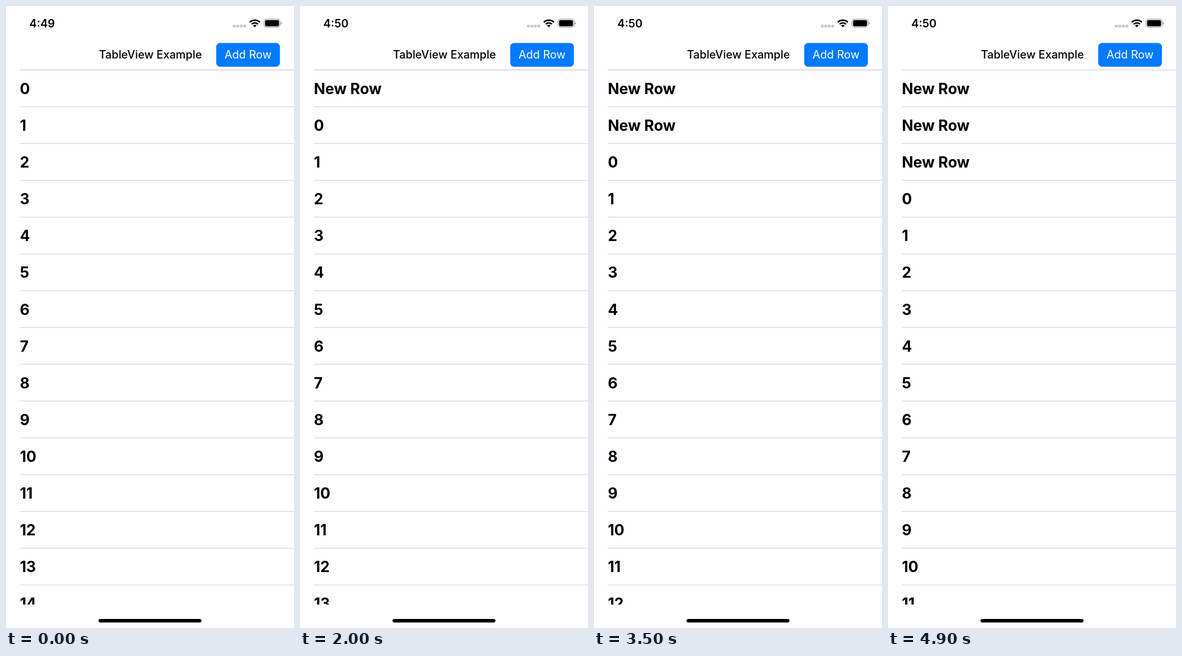
Animation, 509 px wide and 1101 px high, one loop 5000 ms. Source, as an HTML page:

```html
<!DOCTYPE html>
<html lang="en">
<head>
<meta charset="utf-8">
<title>TableView Example</title>
<style>
  html, body { margin: 0; width: 100%; height: 100%; overflow: hidden; background: #fefdff; }
  svg { display: block; width: 100%; height: 100%; font-family: Inter, "Liberation Sans", sans-serif; }
  .row { font-size: 26.5px; font-weight: 700; }
  .title { font-size: 19.7px; font-weight: 500; text-anchor: middle; }
  .action { font-size: 19.7px; text-anchor: middle; }
  .clock { font-size: 19.7px; font-weight: 600; }
</style>
</head>
<body>
<svg viewBox="0 0 509 1101" xmlns="http://www.w3.org/2000/svg">
  <defs>
    <clipPath id="view"><rect x="0" y="112" width="509" height="947.5"/></clipPath>
  </defs>

  <text id="clock" class="clock" x="41.3" y="37.6">4:49</text>
  <g fill="#c9c8cd">
    <rect x="401" y="33" width="5" height="5" rx="1.5"/>
    <rect x="407.2" y="33" width="5" height="5" rx="1.5"/>
    <rect x="413.3" y="33" width="5" height="5" rx="1.5"/>
    <rect x="419.4" y="33" width="5" height="5" rx="1.5"/>
  </g>
  <g fill="none" stroke="#000" stroke-width="2.7">
    <path d="M430.9 28.7A12.7 12.7 0 0 1 448.7 28.7"/>
    <path d="M434.2 32.1A8 8 0 0 1 445.4 32.1"/>
  </g>
  <path d="M436.6 34.5A4.6 4.6 0 0 1 443 34.5L439.8 37.7Z"/>
  <rect x="456.1" y="23.3" width="28.2" height="14.4" rx="4.4" fill="none" stroke="#9b9a9e" stroke-width="1.2"/>
  <rect x="457.9" y="25.1" width="24.6" height="10.8" rx="2.7"/>
  <path d="M485.8 28.2Q487.9 28.8 487.9 30.6T485.8 33Z" fill="#9b9a9e"/>

  <text class="title" x="255.2" y="93.3">TableView Example</text>
  <rect id="button" x="371.5" y="65.5" width="112.5" height="42" rx="6.5"/>
  <text id="label" class="action" x="427.8" y="93.3">Add Row</text>

  <g clip-path="url(#view)">
    <g id="rows"></g>
    <rect x="24.5" y="112.6" width="485" height="1.2" fill="#d4d3d9"/>
  </g>
  <rect x="163.5" y="1085" width="182" height="6.2" rx="3.1"/>
</svg>
<script>
const LOOP = 5000, STEP = 100, PITCH = 65.12, TOP = 113;
const NEW_ROWS = 3, NUMBERED = 15;
const taps = [
  { down: 1500, up: 1700 },
  { down: 3100, up: 3200 },
  { down: 4500, up: 4600 }
];
const $ = id => document.getElementById(id);
const rows = $('rows'), clock = $('clock'), button = $('button'), label = $('label');

function add(tag, attrs, text = '') {
  const el = document.createElementNS('http://www.w3.org/2000/svg', tag);
  for (const key in attrs) el.setAttribute(key, attrs[key]);
  el.textContent = text;
  rows.append(el);
}

// New rows wait above the visible list.
for (let i = -NEW_ROWS; i < NUMBERED; i++) {
  const y = TOP + i * PITCH;
  add('text', { class: 'row', x: 24.4, y: y + 42.8 }, i < 0 ? 'New Row' : String(i));
  add('rect', { x: 24.5, y: y + PITCH - 0.4, width: 485, height: 1.2, fill: '#d4d3d9' });
}

const mix = (a, b, k) => `rgb(${a.map((v, i) => Math.round(v + (b[i] - v) * k))})`;

// Ease in and out, settled three steps after release.
function progress(t, start) {
  if (t < start) return 0;
  const x = Math.min(1, (t - start + 50) / 350);
  return x * x * (3 - 2 * x);
}

function draw(time) {
  const t = Math.floor((time % LOOP) / STEP) * STEP;
  let shift = 0, press = 0;
  for (const { down, up } of taps) {
    const p = progress(t, up);
    shift += p;
    if (t >= down) press = 1 - p;
  }
  rows.setAttribute('transform', `translate(0 ${(shift * PITCH).toFixed(2)})`);
  button.setAttribute('fill', mix([0, 122, 255], [64, 154, 255], press));
  label.setAttribute('fill', mix([255, 255, 255], [207, 230, 255], press));
  clock.textContent = t < taps[0].up ? '4:49' : '4:50';
}

const start = performance.now();
function tick() {
  draw(performance.now() - start);
  requestAnimationFrame(tick);
}
tick();
</script>
</body>
</html>
```
